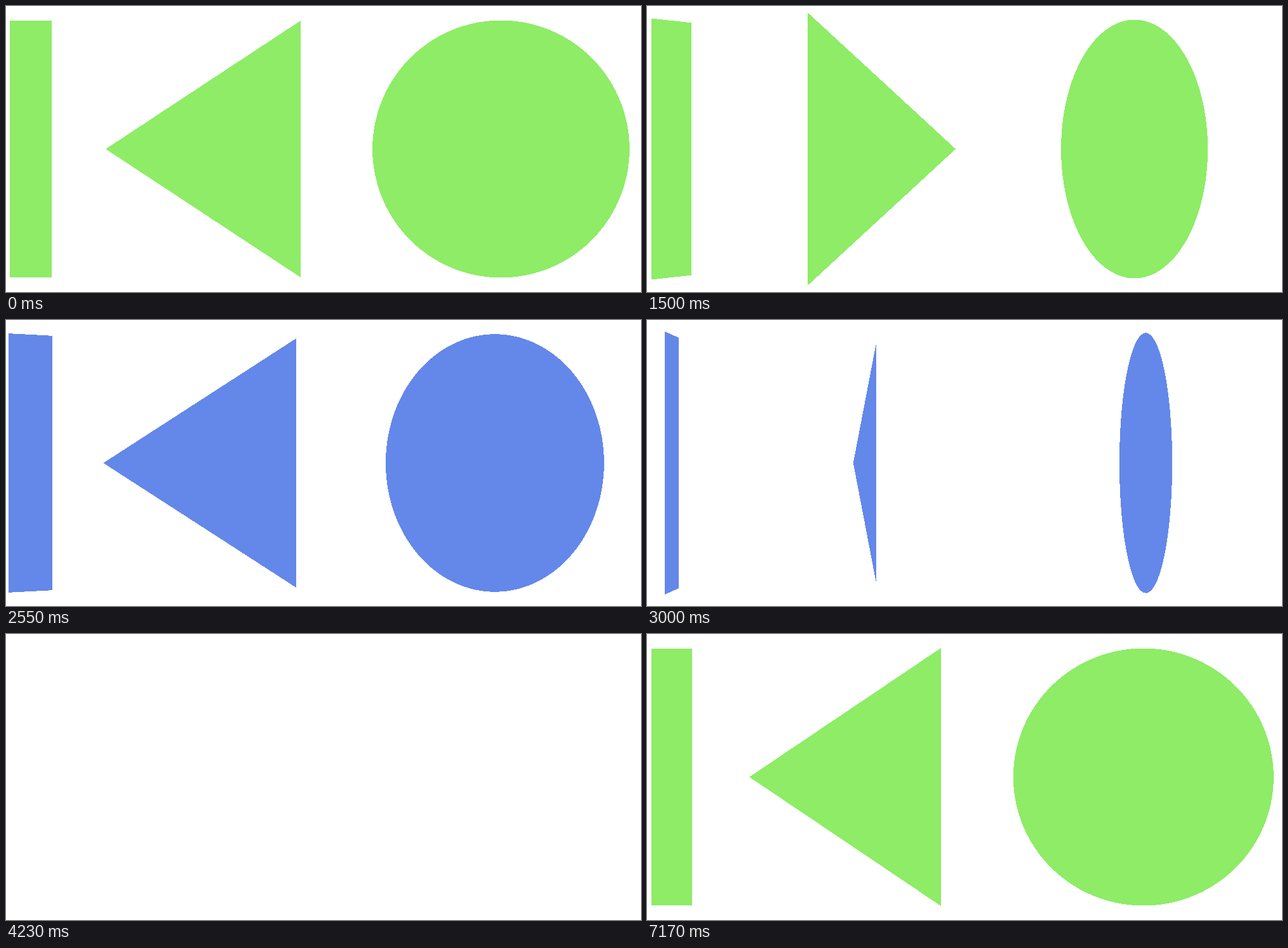
These frames come from a looping animation (1000x450 px, 7.2 s). An HTML page:

```html
<!DOCTYPE html>
<html lang="en">
<head>
<meta charset="utf-8">
<title>Spinning shapes</title>
<style>
  html, body { margin: 0; width: 100%; height: 100%; overflow: hidden; background: #fff; }
  svg { display: block; width: 1000px; height: 450px; shape-rendering: crispEdges; }
</style>
</head>
<body>
<svg viewBox="0 0 1000 450"><path id="shapes"/></svg>
<script>
const LOOP = 7200, TURN = 2400, STEP = 30;
const DEPTH = 1390, CX = 500, CY = 225;
const HALF = 202, RADIUS = 202.4;
const GREEN = '#8eec67', BLUE = '#6488e9', WHITE = '#fff';

const disc = Array.from({ length: 240 }, (_, i) => {
  const a = i / 240 * 2 * Math.PI;
  return [RADIUS * Math.cos(a), RADIUS * Math.sin(a)];
});

// Each shape spins about its own vertical axis; points are relative to it.
const shapes = [
  { axis: 39, points: [[-33, -HALF], [33, -HALF], [33, HALF], [-33, HALF]] },
  { axis: 349, points: [[-192, 0], [115, -HALF], [115, HALF]] },
  { axis: 779.5, points: disc }
];

const path = document.getElementById('shapes');

// Colours swap while the shapes are edge-on.
function colorAt(t) {
  if (t <= 1800 || t >= 6600) return GREEN;
  return t <= 4200 ? BLUE : WHITE;
}

function outline({ axis, points }, cos, sin) {
  return 'M' + points.map(([u, v]) => {
    const k = DEPTH / (DEPTH + u * sin);
    const x = CX + (axis - CX + u * cos) * k;
    const y = CY + v * k;
    return x.toFixed(2) + ' ' + y.toFixed(2);
  }).join('L') + 'Z';
}

function draw(t) {
  const angle = t / TURN * 2 * Math.PI;
  const cos = Math.cos(angle), sin = Math.sin(angle);
  path.setAttribute('d', shapes.map(s => outline(s, cos, sin)).join(''));
  path.setAttribute('fill', colorAt(t));
}

const start = performance.now();
function tick() {
  const t = Math.max(0, performance.now() - start) % LOOP;
  draw(Math.floor(t / STEP) * STEP);
  requestAnimationFrame(tick);
}
draw(0);
requestAnimationFrame(tick);
</script>
</body>
</html>
```
